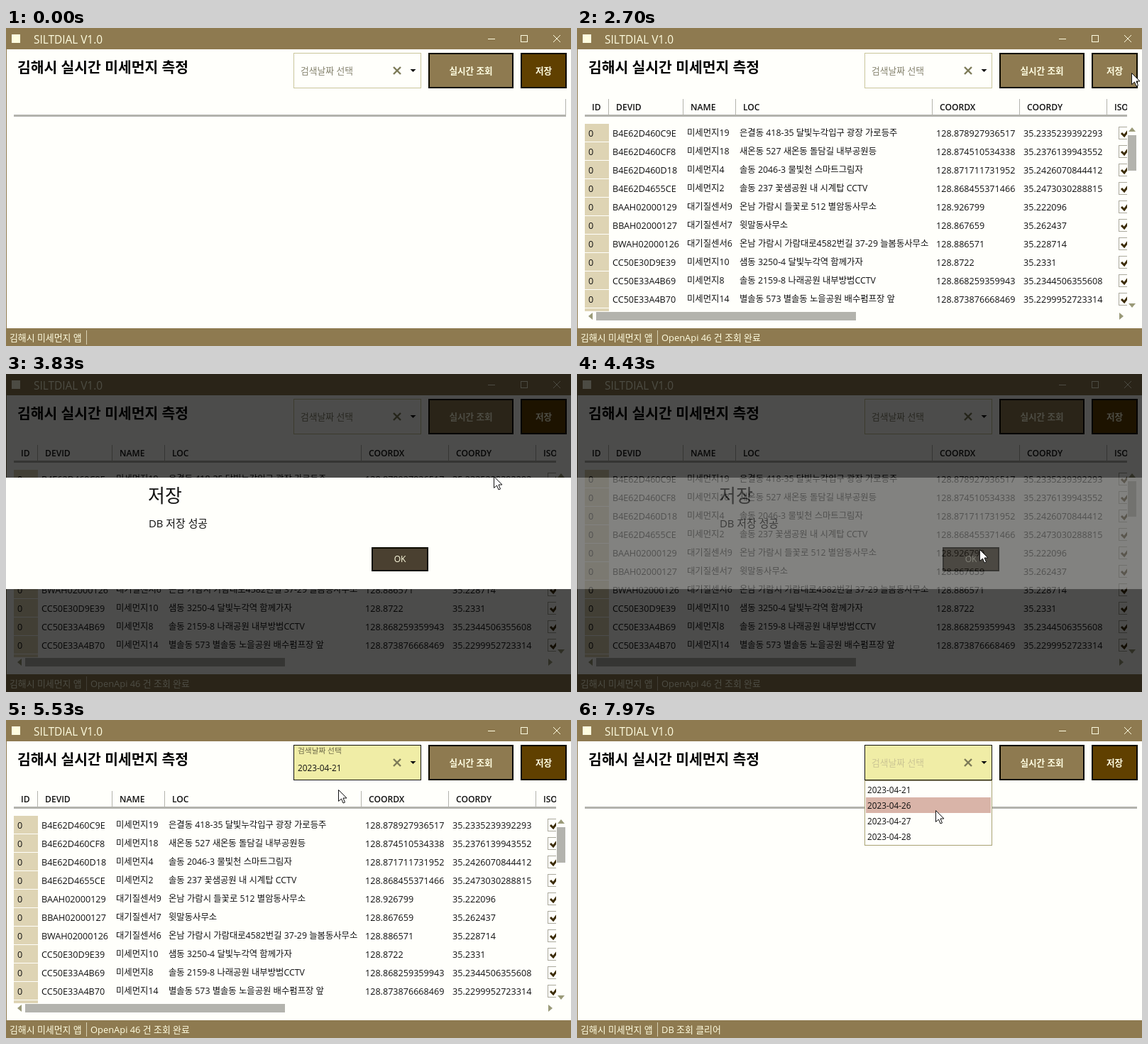
An HTML page with a canvas that plays this animation: 796 px wide and 448 px high, repeating every 8000 ms.

```html
<!DOCTYPE html>
<html lang="ko">
<head>
<meta charset="utf-8">
<title>미세먼지 측정</title>
<style>
html, body { margin: 0; width: 100%; height: 100%; overflow: hidden; background: #fffffb; }
canvas { display: block; width: 100vw; height: 100vh; }
</style>
</head>
<body>
<canvas id="stage" width="796" height="448"></canvas>
<script>
const stage = document.getElementById('stage').getContext('2d');
const dialog = new OffscreenCanvas(796, 448).getContext('2d');
let ctx = stage;
const LOOP = 8000;
const FAMILY = '"Open Sans", "Noto Sans CJK KR", "Noto Sans CJK", sans-serif';
const TAUPE = '#8e7a50', DARK = '#604000', CREAM = '#fffde0', PAPER = '#fffffb', GRAY = '#b3b3ad';

// Moments of the user's session, in ms
const T = {
  loaded: 2330, saveHover: 2560, saveClick: 3190, dialogIn: 3440, okClick: 4340,
  dialogGone: 4470, open: 4960, pick: 5480, filled: 5600, overClear: 6250,
  clear: 6680, reopen: 7340
};

// Pointer stops: time, x, y
const POINTER = [
  [250, 560, 452], [1300, 652, 62], [2330, 652, 62], [2690, 781, 63], [3560, 781, 63],
  [4150, 567, 247], [4460, 567, 247], [4800, 574, 59], [5020, 574, 59], [5400, 468, 98],
  [5640, 468, 98], [6350, 558, 74], [6420, 558, 74], [6600, 552, 63], [6760, 552, 63],
  [7150, 574, 61], [7400, 574, 61], [7900, 505, 127], [8000, 505, 127]
];

const DATES = ['2023-04-21', '2023-04-26', '2023-04-27', '2023-04-28'];

const liveRows = [
  ['B4E62D460C9E', '미세먼지19', '은결동 418-35 달빛누각입구 광장 가로등주', '128.878927936517', '35.2335239392293'],
  ['B4E62D460CF8', '미세먼지18', '새온동 527 새온동 돌담길 내부공원등', '128.874510534338', '35.2376139943552'],
  ['B4E62D460D18', '미세먼지4', '솔동 2046-3 물빛천 스마트그림자', '128.871711731952', '35.2426070844412'],
  ['B4E62D4655CE', '미세먼지2', '솔동 237 꽃샘공원 내 시계탑 CCTV', '128.868455371466', '35.2473030288815'],
  ['BAAH02000129', '대기질센서9', '온남 가람시 들꽃로 512 별암동사무소', '128.926799', '35.222096'],
  ['BBAH02000127', '대기질센서7', '윗말동사무소', '128.867659', '35.262437'],
  ['BWAH02000126', '대기질센서6', '온남 가람시 가람대로4582번길 37-29 늘봄동사무소', '128.886571', '35.228714'],
  ['CC50E30D9E39', '미세먼지10', '샘동 3250-4 달빛누각역 함께가자', '128.8722', '35.2331'],
  ['CC50E33A4B69', '미세먼지8', '솔동 2159-8 나래공원 내부방범CCTV', '128.868259359943', '35.2344506355608'],
  ['CC50E33A4B70', '미세먼지14', '별솔동 573 별솔동 노을공원 배수펌프장 앞', '128.873876668469', '35.2299952723314'],
  []
].map(row => ['0', ...row]);

const savedRows = Array.from({ length: 7 }, (_, i) => [String(41 + 46 * i), 'TEST0004', '대기질센서16',
  '솔내면 하늘마루벌길 53-28 하늘마루벌산업단지   관리사무소', '128.771', '35.2674', '', '0']);

const HEADERS = ['ID', 'DEVID', 'NAME', 'LOC', 'COORDX', 'COORDY', 'ISON', 'PM10AFTER'];
const liveGrid = { rows: liveRows, edges: [44, 149, 223, 500, 623, 746], right: 775, box: 763, checked: true, thumb: 393, tall: true };
const savedGrid = { rows: savedRows, edges: [44, 109, 190, 514, 588, 661, 710], right: 789, box: 678, thumb: 432 };

const clamp = v => Math.max(0, Math.min(1, v));
const ramp = (t, from, to) => clamp((t - from) / (to - from));
const ease = p => p * p * (3 - 2 * p);
const within = (t, from, to) => t >= from && t < to;

function rect(x, y, w, h, fill) {
  ctx.fillStyle = fill;
  ctx.fillRect(x, y, w, h);
}

function frame(x, y, w, h, stroke, width = 1) {
  ctx.strokeStyle = stroke;
  ctx.lineWidth = width;
  ctx.strokeRect(x + width / 2, y + width / 2, w - width, h - width);
}

function poly(points, color, width) {
  ctx.beginPath();
  points.forEach(([x, y]) => ctx.lineTo(x, y));
  if (width) {
    ctx.strokeStyle = color;
    ctx.lineWidth = width;
    ctx.stroke();
  } else {
    ctx.fillStyle = color;
    ctx.fill();
  }
}

function cross(x, y, r, color, width) {
  poly([[x - r, y - r], [x + r, y + r]], color, width);
  poly([[x - r, y + r], [x + r, y - r]], color, width);
}

// y is the middle of the capitals
function text(s, x, y, size, color = '#111', weight = 400, align = 'left') {
  ctx.font = `${weight} ${size}px ${FAMILY}`;
  ctx.textAlign = align;
  ctx.fillStyle = color;
  ctx.fillText(s, x, Math.round(y + size * 0.36));
}

function button(x, y, w, h, label, fill, size = 12.6, weight = 700) {
  rect(x, y, w, h, fill);
  frame(x, y, w, h, '#0c0a00', 2);
  text(label, x + w / 2, y + h / 2, size, CREAM, weight, 'center');
}

function clipped(x, y, w, h, draw) {
  ctx.save();
  ctx.beginPath();
  ctx.rect(x, y, w, h);
  ctx.clip();
  draw();
  ctx.restore();
}

function drawWindow(status) {
  rect(0, 0, 796, 448, PAPER);
  rect(0, 0, 1, 448, TAUPE);
  rect(0, 0, 796, 30, TAUPE);
  rect(0, 423, 796, 25, TAUPE);
  rect(8, 9, 12, 12, CREAM);
  text('SILTDIAL V1.0', 39, 16, 15.4, CREAM);
  rect(679, 15, 10, 1, CREAM);
  frame(725, 10, 10, 10, CREAM);
  cross(776, 15, 5, CREAM, 1);
  text('김해시 실시간 미세먼지 측정', 16, 56, 20.4, '#000', 700);
  text('김해시 미세먼지 앱', 5, 436, 12.9, CREAM);
  rect(113, 426, 1, 20, '#d8d2b4');
  text(status, 119, 436, 12.9, CREAM);
}

function drawCombo(t) {
  const active = t >= T.open;
  const value = within(t, T.pick, T.clear);
  rect(405, 35, 180, 50, active ? '#f0eda6' : PAPER);
  if (within(t, T.overClear, T.clear + 150)) rect(540, 36, 21, 48, '#dcd8a8');
  frame(405, 35, 180, 50, active ? '#111' : '#cac69c');
  if (value) {
    text('검색날짜 선택', 411, 43, 10.7, '#6c6848');
    text(DATES[0], 411, 68, 11.8);
  } else {
    text('검색날짜 선택', 415, 60, 12.8, active ? '#cbc594' : '#85836e');
  }
  cross(551, 60, 5, '#7d7b58', 2.4);
  poly([[569.5, 58], [577.5, 58], [573.5, 62]], '#111');
}

function drawDropdown(t, pointerY) {
  if (!within(t, T.open, T.pick) && t < T.reopen) return;
  rect(405, 85, 180, 92, PAPER);
  frame(405, 85, 180, 92, '#a9a273');
  DATES.forEach((date, i) => {
    const top = 87 + 22 * i;
    if (pointerY >= top && pointerY < top + 22) rect(407, top, 176, 22, '#d9b4a8');
    text(date, 409, top + 11.5, 11.8);
  });
}

function drawGrid(grid) {
  const { edges, right } = grid;
  rect(11, 122, right - 11, 3, GRAY);
  clipped(11, 98, right - 11, 24, () => {
    edges.forEach(x => rect(x, 100, 1, 22, GRAY));
    [10, ...edges].forEach((x, i) => text(HEADERS[i], x + 11, 111.5, 12.1, '#111', 600));
  });
  clipped(11, 126, right - 11, 273, () => grid.rows.forEach((row, r) => {
    const y = 148 + 26 * r;
    rect(11, y - 13, 34, 25, '#ded4b4');
    row.forEach((cell, c) => {
      const x = c ? edges[c - 1] + 6 : 16;
      text(cell, x, y, /[가-힣]/.test(cell) ? 12.35 : 12.6);
    });
    frame(grid.box, y - 9, 18, 18, '#aaa99c');
    if (grid.checked) poly([[grid.box + 4, y], [grid.box + 8, y + 4], [grid.box + 14, y - 4]], '#3c2c08', 3);
  }));
  drawScrollbars(grid);
}

function drawScrollbars({ right, thumb, tall }) {
  const arrow = '#9a9a78';
  rect(27, 400, thumb - 27, 12, GRAY);
  poly([[22, 401], [22, 411], [16, 406]], arrow);
  poly([[right - 11, 401], [right - 11, 411], [right - 5, 406]], arrow);
  if (!tall) return;
  rect(776, 151, 12, 50, GRAY);
  poly([[777, 146], [787, 146], [782, 140]], arrow);
  poly([[777, 388], [787, 388], [782, 394]], arrow);
}

// The dialog is painted on its own layer so that it fades as one piece
function paintDialog() {
  ctx = dialog;
  rect(0, 146, 796, 157, PAPER);
  text('저장', 200, 172, 26, '#111');
  text('DB 저장 성공', 201, 211, 14.9, '#111');
  button(515, 244, 80, 34, 'OK', '#4a4030', 12, 400);
  ctx = stage;
}

function drawDialog(t) {
  const shade = 0.7 * ramp(t, T.saveClick, T.dialogIn) * (1 - ramp(t, T.dialogGone, 4720));
  if (!shade) return;
  rect(0, 0, 796, 448, `rgba(0, 0, 0, ${shade})`);
  const opacity = ramp(t, T.dialogIn, 3680) * (1 - ramp(t, T.okClick, T.dialogGone));
  if (!opacity) return;
  paintDialog();
  ctx.globalAlpha = opacity;
  ctx.drawImage(dialog.canvas, 0, 0);
  ctx.globalAlpha = 1;
}

function pointerAt(t) {
  const next = POINTER.findIndex(stop => stop[0] > t);
  if (next < 1) return null;
  const [t0, x0, y0] = POINTER[next - 1], [t1, x1, y1] = POINTER[next];
  const p = ease(ramp(t, t0, t1));
  return { x: x0 + (x1 - x0) * p, y: y0 + (y1 - y0) * p };
}

function drawPointer({ x, y }) {
  ctx.save();
  ctx.translate(Math.round(x) + 0.5, Math.round(y) + 0.5);
  const shape = [[0, 0], [0, 16], [4, 12.5], [6.5, 18.5], [9, 17.5], [6.5, 11.5], [11.5, 11.5], [0, 0]];
  poly(shape, '#fff');
  poly(shape, '#111', 1);
  ctx.restore();
}

function statusAt(t) {
  if (t < T.loaded) return '';
  if (t < T.filled) return 'OpenApi 46 건 조회 완료';
  return t < T.clear ? 'DB 7 건 조회 완료' : 'DB 조회 클리어';
}

function render(t) {
  const pointer = pointerAt(t);
  drawWindow(statusAt(t));
  drawCombo(t);
  button(595, 35, 120, 50, '실시간 조회', TAUPE);
  button(725, 35, 65, 50, '저장', within(t, T.saveHover, T.saveClick) ? TAUPE : DARK);
  if (within(t, T.loaded, T.filled)) drawGrid(liveGrid);
  else if (within(t, T.filled, T.clear)) drawGrid(savedGrid);
  else {
    rect(11, 122, 778, 3, GRAY);
    if (t < T.loaded) rect(788, 100, 1, 22, GRAY);
  }
  drawDropdown(t, pointer ? pointer.y : 0);
  drawDialog(t);
  if (pointer) drawPointer(pointer);
}

const start = performance.now();
function tick() {
  render((performance.now() - start) % LOOP);
  requestAnimationFrame(tick);
}
tick();
</script>
</body>
</html>
```
